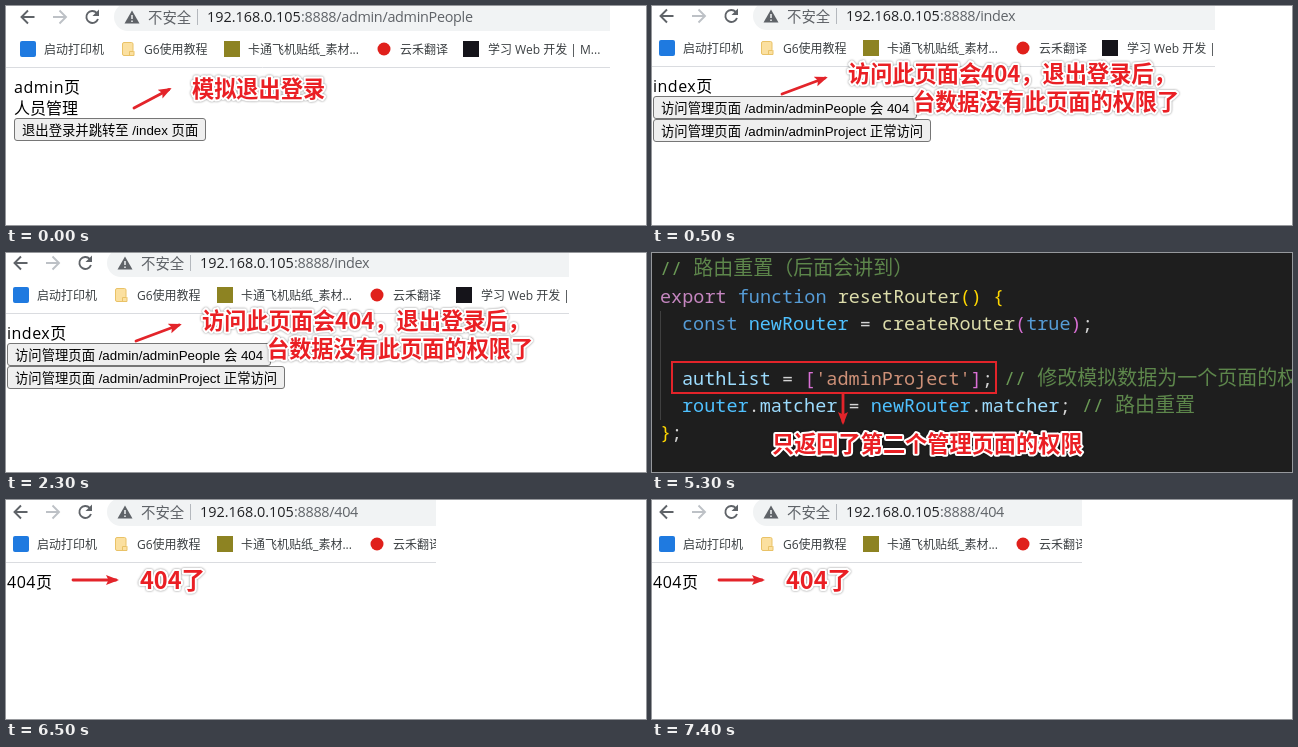
Animation of 640x219 px, one loop 8 s. Source, as an HTML page:

```html
<!DOCTYPE html>
<html lang="zh-CN">
<head>
<meta charset="utf-8">
<title>退出登录演示</title>
<style>
  html, body { margin: 0; width: 100%; height: 100%; overflow: hidden; background: #fff; }
  svg.stage { display: block; width: 100%; height: 100%; }
  text { white-space: pre; }

  .scene { opacity: 0; animation: 8s step-end infinite; }
  .logout { animation-name: logout; }
  .index { animation-name: index; }
  .code { animation-name: code; }
  .missing { animation-name: missing; }
  @keyframes logout { 0% { opacity: 1; } 6.25%, 100% { opacity: 0; } }
  @keyframes index { 0% { opacity: 0; } 6.25% { opacity: 1; } 43.75%, 100% { opacity: 0; } }
  @keyframes code { 0% { opacity: 0; } 43.75% { opacity: 1; } 81.25%, 100% { opacity: 0; } }
  @keyframes missing { 0% { opacity: 0; } 81.25%, 100% { opacity: 1; } }

  .url { font: 14.4px "Open Sans", "Noto Sans CJK SC", sans-serif; fill: #5f6368; }
  .host { fill: #202124; }
  .path { letter-spacing: -.3px; }
  .unsafe { font: 14.4px "Noto Sans CJK SC", sans-serif; fill: #5f6368; }
  .marks { font: 12px "Open Sans", "Noto Sans CJK SC", sans-serif; fill: #3c4043; }
  .page { font: 16px "Open Sans", "Noto Sans CJK SC", sans-serif; fill: #000; }
  .latin { letter-spacing: .5px; }
  .btn rect { fill: #efefef; stroke: #767676; }
  .btn text { font: 13.333px "Liberation Sans", "Noto Sans CJK SC", sans-serif; }

  .note {
    font: bold 22.2px "Noto Sans CJK SC", sans-serif; fill: #ea1f24;
    stroke: #fff; stroke-width: 4px; stroke-linejoin: round; paint-order: stroke;
    filter: drop-shadow(0 0 1px rgba(0, 0, 0, .45));
  }
  .arrow { stroke: #e3242a; stroke-width: 2.8; stroke-linecap: round; marker-end: url(#head); }

  .src { font: 500 18.5px "Noto Sans Mono", "Noto Sans CJK SC", monospace; fill: #d4d4d4; }
  .kw { fill: #c586c0; }
  .st { fill: #569cd6; }
  .fn { fill: #dcdcaa; }
  .cn { fill: #4fc1ff; }
  .vr { fill: #9cdcfe; }
  .str { fill: #ce9178; }
  .b1 { fill: #ffd700; }
  .b2 { fill: #da70d6; }
  .cm { fill: #6a9955; font-weight: 400; }
  .zh { font: 300 20px "Noto Sans CJK SC", sans-serif; fill: #5d864b; }
</style>
</head>
<body>
<svg class="stage" viewBox="0 0 640 219">
  <defs>
    <marker id="head" markerUnits="userSpaceOnUse" markerWidth="14" markerHeight="12" refX="10" refY="6" orient="auto">
      <path d="M0 1 13 6 0 11 2.5 6z" fill="#e3242a"/>
    </marker>
    <clipPath id="clipLogout"><rect width="604" height="219"/></clipPath>
    <clipPath id="clipIndex"><rect width="563" height="219"/></clipPath>
    <clipPath id="clipMissing"><rect width="430" height="219"/></clipPath>

    <g id="browser">
      <rect x="108" y="-3" width="600" height="28" rx="14" fill="#f1f3f4"/>
      <g fill="none" stroke="#5f6368" stroke-width="1.9">
        <path d="M28.500 11H16M22 4.500 15.500 11l6.500 6.500"/>
        <path d="M47 11h12.500M53.500 4.500 60 11l-6.500 6.500" stroke="#bdc1c6"/>
        <path d="M90.700 6.800A6 6 0 1 0 92 13"/>
      </g>
      <path d="M93 3.500v6.500h-6.500z" fill="#5f6368"/>
      <path d="M126 4.500 133.500 17.500h-15z" fill="#5f6368"/>
      <path d="M126 9v4M126 14.500v1.500" stroke="#f1f3f4" stroke-width="1.500"/>
      <text class="unsafe" x="142" y="16.500">不安全</text>
      <path d="M191.500 3v16" stroke="#b4b8bd"/>
      <text class="url host" x="201" y="16">192.168.0.105</text>

      <g class="marks">
        <rect x="14" y="35" width="16" height="16" rx="2" fill="#1f7ae0"/>
        <text x="38" y="48">启动打印机</text>
        <path d="M116.500 38q0-1.500 1.500-1.500h7.500q1.500 0 1.500 1.500v6.500l1 1v4h-10q-1.500 0-1.500-1.500z" fill="#fbe0a0" stroke="#e9c267"/>
        <path d="M123.500 49v-3.500h4" fill="none" stroke="#e9c267"/>
        <text x="138" y="48">G6使用教程</text>
        <rect x="218" y="35" width="16" height="16" fill="#8d8322"/>
        <text x="242" y="48">卡通飞机贴纸_素材...</text>
        <circle cx="378" cy="43" r="6.500" fill="#e0201b"/>
        <text x="394" y="48">云禾翻译</text>
        <rect x="457" y="35" width="16" height="16" fill="#15141a"/>
        <text x="482" y="48">学习 Web 开发 | M...</text>
      </g>
      <path d="M0 61.500h720" stroke="#dadce0"/>
    </g>
  </defs>

  <g class="scene logout">
    <g clip-path="url(#clipLogout)">
      <use href="#browser"/>
      <text class="url path" x="295" y="16">:8888/admin/adminPeople</text>
    </g>
    <g class="page">
      <text class="latin" x="8" y="87">admin页</text>
      <text x="8" y="108">人员管理</text>
      <g class="btn">
        <rect x="8.500" y="112.500" width="191" height="22" rx="2.500"/>
        <text x="16" y="129">退出登录并跳转至 /index 页面</text>
      </g>
    </g>
    <path class="arrow" d="M128 102 163 83.500"/>
    <text class="note" x="186" y="91">模拟退出登录</text>
  </g>

  <g class="scene index">
    <g clip-path="url(#clipIndex)">
      <use href="#browser" x="-7" y="-1"/>
      <text class="url path" x="288" y="15">:8888/index</text>
    </g>
    <g class="page">
      <text class="latin" x="1" y="86">index页</text>
      <g class="btn">
        <rect x="1.500" y="90.500" width="263" height="22" rx="2.500"/>
        <text x="9" y="107">访问管理页面 /admin/adminPeople 会 404</text>
        <rect x="1.500" y="113.500" width="277" height="22" rx="2.500"/>
        <text x="9" y="130">访问管理页面 /admin/adminProject 正常访问</text>
      </g>
    </g>
    <path class="arrow" d="M130 88 173 72"/>
    <text class="note" x="196" y="76">访问此页面会404，退出登录后，</text>
    <text class="note" x="261" y="104">台数据没有此页面的权限了</text>
  </g>

  <g class="scene code">
    <rect width="640" height="219" fill="#1e1e1e"/>
    <path d="M8.500 58v109" stroke="#404040"/>
    <g class="src">
      <text class="cm" x="8" y="22">// <tspan class="zh">路由重置（后面会讲到）</tspan></text>
      <text x="8" y="50"><tspan class="kw">export</tspan> <tspan class="st">function</tspan> <tspan class="fn">resetRouter</tspan><tspan class="b1">() {</tspan></text>
      <text x="30" y="77"><tspan class="st">const</tspan> <tspan class="cn">newRouter</tspan> = <tspan class="fn">createRouter</tspan><tspan class="b2">(</tspan><tspan class="st">true</tspan><tspan class="b2">)</tspan>;</text>
      <text x="30" y="132"><tspan class="vr">authList</tspan> = <tspan class="b2">[</tspan><tspan class="str">'adminProject'</tspan><tspan class="b2">]</tspan>; <tspan class="cm">// <tspan class="zh">修改模拟数据为一个页面的权</tspan></tspan></text>
      <text x="30" y="159"><tspan class="cn">router</tspan>.<tspan class="vr">matcher</tspan> = <tspan class="cn">newRouter</tspan>.<tspan class="vr">matcher</tspan>; <tspan class="cm">// <tspan class="zh">路由重置</tspan></tspan></text>
      <text x="8" y="186"><tspan class="b1">}</tspan>;</text>
    </g>
    <rect x="20" y="109" width="324" height="31" fill="none" stroke="#e3242a" stroke-width="2"/>
    <path class="arrow" d="M191 141v28"/>
    <text class="note" x="120" y="199">只返回了第二个管理页面的权限</text>
  </g>

  <g class="scene missing">
    <g clip-path="url(#clipMissing)">
      <use href="#browser" x="-7" y="1"/>
      <text class="url path" x="288" y="17">:8888/404</text>
    </g>
    <text class="page latin" x="1" y="88">404页</text>
    <path class="arrow" d="M67 80h43"/>
    <text class="note" style="font-size:23.500px" x="134" y="89">404了</text>
  </g>
</svg>
</body>
</html>
```
